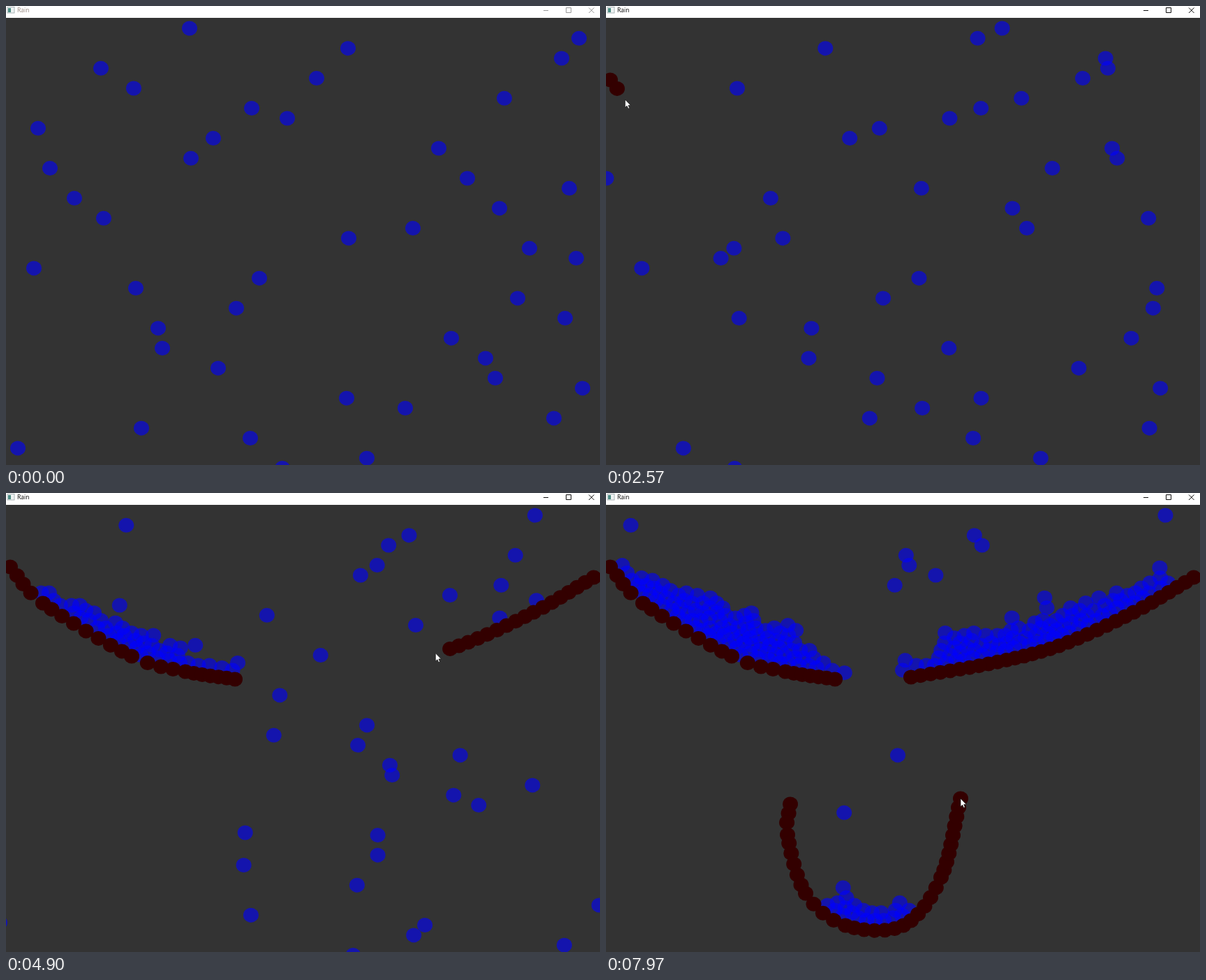
These frames come from a looping animation (851x658 px, 8000 ms). An HTML page:

```html
<!DOCTYPE html>
<html lang="en">
<head>
<meta charset="utf-8">
<title>Rain</title>
<style>
  html, body { margin: 0; width: 100%; height: 100%; overflow: hidden; background: #333; }
  svg { display: block; width: 100vw; height: 100vh; }
  #bar text { font: 8.5px "Open Sans", "Noto Sans", sans-serif; }
</style>
</head>
<body>
<svg viewBox="0 0 851 658">
  <rect width="851" height="658" fill="#333"/>
  <g id="rain" fill="#00f" fill-opacity=".6"></g>
  <g id="wall" fill="#300"></g>
  <g id="bar">
    <rect width="851" height="17" fill="#fff"/>
    <rect x="2" y="1.5" width="10" height="8.5" fill="#eef2f2" stroke="#9aa5a8" stroke-width=".8"/>
    <rect x="3" y="3" width="4" height="6" fill="#4d8c84"/>
    <text id="name" x="16" y="9.3">Rain</text>
    <path id="buttons" fill="none" d="M770 6.5h7M802.5 2.5h7v7h-7zM835 2.5l7.5 7.5m0-7.5l-7.5 7.5"/>
  </g>
  <path id="cursor" fill="#fff" stroke="#111" stroke-width=".7" d="M0 0V11.6L2.7 9.2 4.5 13.2 6.4 12.4 4.7 8.4H8.2Z"/>
</svg>
<script>
const LOOP = 8000, FRAMES = 240, FALL = 14.33, TOP = 32, FOCUS = 33;
const DROP_GAP = 11, WALL_GAP = 13;
const $ = id => document.getElementById(id);

// Cursor knots: frame, x, y, wall dots laid on the way (1 starts a stroke)
const PATH = [
  [26, -20, 320], [44, 22, 153],
  [75, 6, 106, 1], [78.5, 53, 158, 4], [88, 180, 234, 8], [93, 257, 256, 4], [103, 328, 267, 6],
  [122, 478, 271],
  [134, 842, 121, 1], [139, 756, 171, 7], [145, 649, 219, 8], [151, 548, 245, 8], [157, 437, 264, 8],
  [173, 391, 347],
  [182, 264, 446, 1], [186, 260, 490, 3], [193, 286, 574, 6], [199, 343, 620, 4], [206, 426, 620, 6],
  [213.5, 480, 551, 6], [238, 508, 438, 9]
];

// Columns of the drops in the air at the start, top to bottom
const OPENING = [263, 821, 490, 796, 136, 445, 183, 714, 352, 403, 46, 297, 620, 265, 63, 661, 807, 98, 707, 140,
  583, 491, 750, 817, 40, 363, 186, 733, 330, 801, 218, 638, 224, 687, 304, 701, 826, 488, 572, 785, 194, 350,
  17, 517, 396];

let seed = 20177;
function rnd() {
  seed = (Math.imul(seed, 1664525) + 1013904223) >>> 0;
  return seed / 4294967296;
}

// Point on the segment that ends at knot i: Catmull-Rom in a stroke, straight between strokes
function along(i, u) {
  const b = PATH[i - 1], c = PATH[i];
  const inStroke = c[3] > 1;
  const a = inStroke && b[3] > 1 ? PATH[i - 2] : null;
  const d = inStroke && PATH[i + 1]?.[3] > 1 ? PATH[i + 1] : null;
  return [1, 2].map(k => {
    const p = a ? a[k] : 2 * b[k] - c[k], q = d ? d[k] : 2 * c[k] - b[k];
    return b[k] + u / 2 * (c[k] - p +
      u * (2 * p - 5 * b[k] + 4 * c[k] - q + u * (3 * b[k] - p - 3 * c[k] + q)));
  });
}

function cursorAt(frame) {
  const end = PATH.length - 1;
  if (frame > PATH[end][0]) return along(end, 1);
  const i = PATH.findIndex(k => k[0] >= frame);
  if (i < 1) return null;
  const from = PATH[i - 1][0];
  return along(i, (frame - from) / (PATH[i][0] - from));
}

function layWall() {
  const dots = [];
  for (let i = 1; i < PATH.length; i++) {
    const from = PATH[i - 1][0], [to, , , n = 0] = PATH[i];
    for (let j = 1; j <= n; j++) {
      const [x, y] = along(i, j / n);
      dots.push({ x, y, frame: from + (to - from) * j / n + 1 });
    }
  }
  return dots;
}

function simulate(wall) {
  const frames = [];
  let drops = [];

  const blocks = (o, d, x, y, gap) => {
    if (Math.abs(o.x - x) >= gap || Math.abs(o.y - y) >= gap) return false;
    const after = (o.x - x) ** 2 + (o.y - y) ** 2;
    return after < gap * gap && after < (o.x - d.x) ** 2 + (o.y - d.y) ** 2;
  };

  for (let step = 1 - OPENING.length; step < FRAMES * 2; step++) {
    const solid = wall.filter(o => o.frame <= step / 2);
    const move = (d, dx, dy) => {
      const x = d.x + dx, y = d.y + dy;
      if (solid.some(o => blocks(o, d, x, y, WALL_GAP))) return false;
      if (drops.some(o => o !== d && blocks(o, d, x, y, DROP_GAP))) return false;
      d.x = x;
      d.y = y;
      return true;
    };
    drops.sort((a, b) => b.y - a.y);
    for (const d of drops) {
      if (move(d, 0, FALL) || move(d, 0, FALL / 4) || rnd() > .4) continue;
      const dx = (3 + 6 * rnd()) * (rnd() < .5 ? -1 : 1);
      move(d, dx, FALL / 4) || move(d, -dx, FALL / 4) || move(d, dx, 0);
    }
    drops = drops.filter(d => d.y < 670);
    drops.push({ x: step <= 0 ? OPENING[-step] : rnd() * 851, y: TOP });
    if (step >= 0 && step % 2 === 0) frames.push(drops.map(d => [d.x, d.y]));
  }
  return frames;
}

function ellipse(parent) {
  const el = document.createElementNS("http://www.w3.org/2000/svg", "ellipse");
  el.setAttribute("rx", 11);
  el.setAttribute("ry", 10.5);
  parent.appendChild(el);
  return el;
}

function place(el, x, y) {
  el.setAttribute("cx", x.toFixed(1));
  el.setAttribute("cy", y.toFixed(1));
}

function show(el, on) {
  el.setAttribute("visibility", on ? "visible" : "hidden");
}

const wall = layWall();
const frames = simulate(wall);
const pool = Array.from({ length: Math.max(...frames.map(f => f.length)) }, () => ellipse($("rain")));
for (const dot of wall) {
  dot.el = ellipse($("wall"));
  place(dot.el, dot.x, dot.y);
}

function draw(n) {
  const drops = frames[n];
  pool.forEach((el, i) => {
    show(el, i < drops.length);
    if (i < drops.length) place(el, ...drops[i]);
  });
  for (const dot of wall) show(dot.el, dot.frame <= n);

  const tip = cursorAt(n);
  show($("cursor"), tip);
  if (tip) $("cursor").setAttribute("transform", `translate(${tip[0].toFixed(1)} ${tip[1].toFixed(1)})`);

  const active = n >= FOCUS;
  $("name").setAttribute("fill", active ? "#000" : "#94857c");
  $("buttons").setAttribute("stroke", active ? "#111" : "#999");
}

let last = -1;
const start = performance.now();
function tick(now) {
  const t = Math.max(0, now - start) % LOOP;
  const n = Math.min(FRAMES - 1, Math.floor(t * .03 + .12));
  if (n !== last) draw(last = n);
  requestAnimationFrame(tick);
}
draw(0);
requestAnimationFrame(tick);
</script>
</body>
</html>
```
